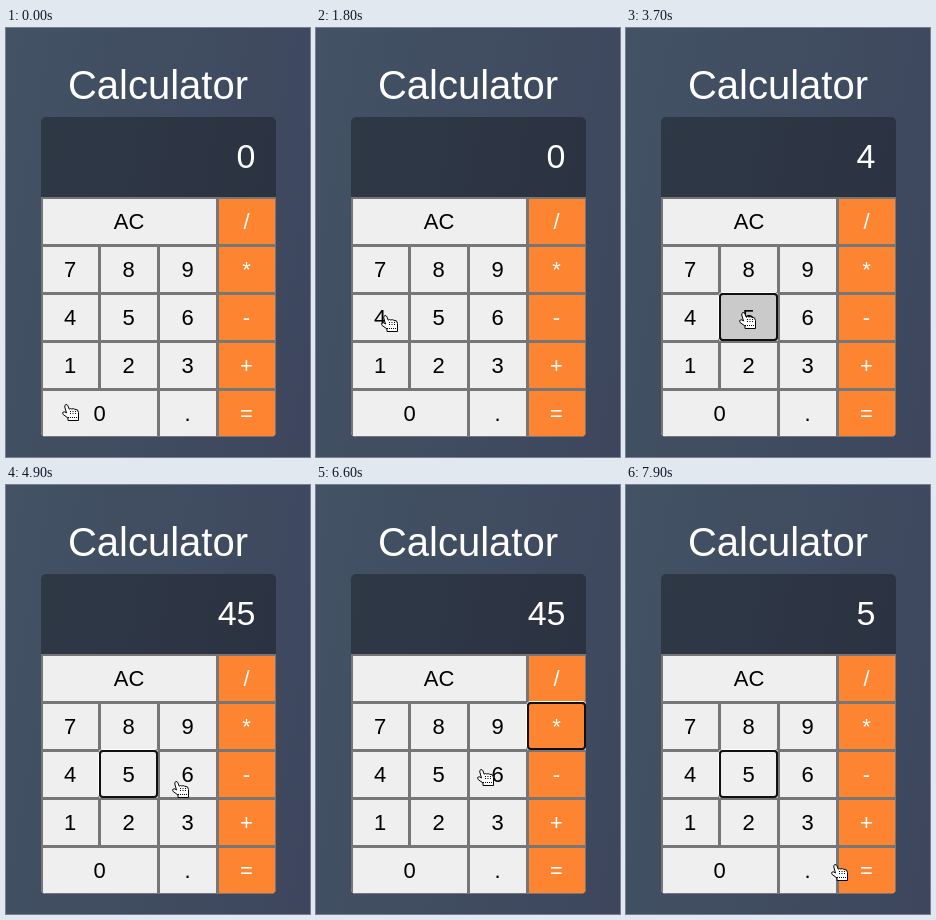
An HTML page for the animation above (8000 ms loop, 304 by 429 pixels).

```html
<!DOCTYPE html>
<html lang="en">
<head>
<meta charset="utf-8">
<title>Calculator</title>
<style>
  html, body { margin: 0; width: 100%; height: 100%; overflow: hidden; }
  body {
    position: relative;
    background: linear-gradient(100deg, #435264, #3d465d);
    color: #fff;
    font-family: "Liberation Sans", Arial, sans-serif;
  }
  h1 {
    position: absolute; left: 0; top: 33px; width: 304px; margin: 0;
    font-size: 40px; font-weight: 400; line-height: 48px; text-align: center;
  }
  #calc {
    position: absolute; left: 35px; top: 89px; width: 235px; height: 320px;
    border-radius: 5px; overflow: hidden;
  }
  #display {
    box-sizing: border-box; height: 80px; padding-right: 20.5px;
    background: rgba(0, 0, 0, .3);
    font-size: 34px; line-height: 78px; text-align: right;
  }
  #keys {
    display: grid;
    grid-template-columns: 58px repeat(3, 59px);
    grid-auto-rows: 48px;
  }
  .key {
    position: relative; z-index: 0;
    background: #efefef; color: #000;
    box-shadow: inset 2px 2px #767676, inset -1px -1px #767676;
    font-size: 22px; line-height: 49px; text-align: center;
  }
  .op { background: #fd8430; color: #fff; }
  .pressed:not(.op) { background: #cacaca; }
  .focus::after {
    content: ""; position: absolute; inset: 0;
    border: 2px solid #101010; border-radius: 4px;
    box-shadow: 0 0 0 1px #fff;
  }
  #hand { position: absolute; left: 0; top: 0; }
</style>
</head>
<body>
<h1>Calculator</h1>
<div id="calc">
  <div id="display">0</div>
  <div id="keys"></div>
</div>
<svg id="hand" width="18" height="17" fill="#fff" stroke="#000" stroke-linejoin="round">
  <path d="M4.5 9L2.8 3Q2.4 1 3.9 .6Q5.4 .4 5.9 1.8L7.2 5.2Q8.4 4 9.8 5Q11.2 4.2 12.6 5.2Q16.5 5 16.5 8.5V16.5H6V14L1.2 10.5Q0 9 1.2 8Q2.6 7.2 4.5 9Z"/>
  <path d="M6 13.5H16.5M8.5 7V10M11 7V10M13.5 7V10" stroke-dasharray="1 1"/>
</svg>
<script>
const LOOP = 8000, STEP = 100;
const HOME = [56, 376];
const $ = id => document.getElementById(id);

const keys = {};
for (const label of ["AC", ..."/789*456-123+0.="]) {
  const key = keys[label] = document.createElement("div");
  key.className = "/*-+=".includes(label) ? "key op" : "key";
  key.textContent = label;
  key.style.gridColumn = "span " + ({ AC: 3, 0: 2 }[label] || 1);
  $("keys").append(key);
}

// Each glide runs to a point, bent towards an optional control point
const glides = [
  { at: 500, steps: 8, to: [83, 290], bend: [144, 196] },
  { at: 1500, steps: 4, to: [65, 287] },
  { at: 3200, steps: 1, to: [113, 284] },
  { at: 4200, steps: 5, to: [164, 295] },
  { at: 4900, steps: 7, to: [232, 237], bend: [181, 308] },
  { at: 6300, steps: 6, to: [128, 297], bend: [196, 273] },
  { at: 7600, steps: 4, to: [205, 379] }
];

const clicks = [
  { at: 3000, key: "4" },
  { at: 3700, key: "5" },
  { at: 6000, key: "*" },
  { at: 7200, key: "5" }
];

const ease = p => p * p * (3 - 2 * p);

function pointer(t) {
  let from = HOME;
  for (const { at, steps, to, bend } of glides) {
    if (t < at) break;
    const e = ease(Math.min(1, (Math.floor((t - at) / STEP) + 1) / steps));
    from = from.map((a, i) => {
      const mid = bend ? bend[i] : (a + to[i]) / 2;
      return (1 - e) ** 2 * a + 2 * e * (1 - e) * mid + e * e * to[i];
    });
  }
  return from.map(Math.round);
}

// A key takes effect on release; a digit after an operator starts a new number
function display(t) {
  let text = "0", fresh = true;
  for (const { at, key } of clicks) {
    if (t < at + STEP) break;
    const digit = /\d/.test(key);
    if (digit) text = fresh ? key : text + key;
    fresh = !digit;
  }
  return text;
}

function draw() {
  const t = performance.now() % LOOP;
  const [x, y] = pointer(t);
  $("hand").style.transform = `translate(${x}px, ${y}px)`;
  $("display").textContent = display(t);

  const last = clicks.filter(c => c.at <= t).pop();
  for (const label in keys) {
    const on = last?.key === label;
    keys[label].classList.toggle("focus", on);
    keys[label].classList.toggle("pressed", on && t < last.at + STEP);
  }
  requestAnimationFrame(draw);
}
draw();
</script>
</body>
</html>
```
